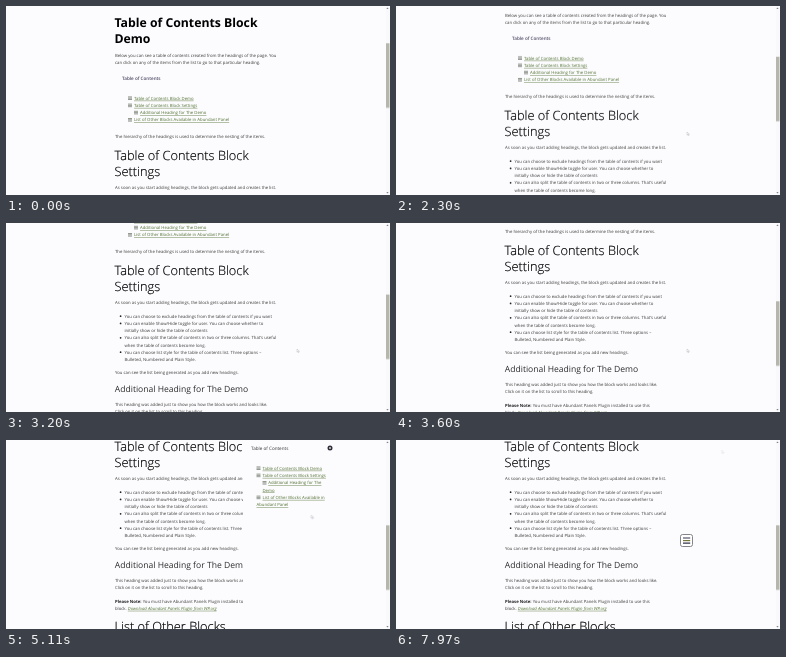
An HTML page for the animation above (8000 ms loop, 384x189 px).

```html
<!DOCTYPE html>
<html lang="en">
<head>
<meta charset="utf-8">
<title>Table of Contents Block Demo</title>
<style>
html, body { margin: 0; width: 100%; height: 100%; overflow: hidden; background: #fcfcff; }
svg { display: block; width: 100vw; height: 100vh; }
text { font: 4.28px "Open Sans", "Noto Sans", sans-serif; fill: #3c3c38; text-rendering: geometricPrecision; white-space: pre; }
.title { font-size: 12.25px; font-weight: 700; fill: #000; }
.h2 { font-size: 12.8px; font-weight: 300; fill: #000; stroke: #000; stroke-width: .18px; }
.h3 { font-size: 8.57px; fill: #2c2c2c; }
.label { font-size: 4.6px; font-weight: 600; fill: #4c4860; }
.panelLabel { font-size: 4.6px; font-weight: 500; fill: #333; }
.strong { font-weight: 700; fill: #222; }
.link { fill: #53702f; text-decoration: underline; text-decoration-color: #7f9c50; text-decoration-thickness: .5px; }
.italic { font-style: italic; }
</style>
</head>
<body>
<svg viewBox="0 0 384 189" preserveAspectRatio="none">
  <rect width="384" height="189" fill="#fcfcff"/>
  <g id="page"></g>
  <g id="panel"><rect x="237" width="147" height="189" fill="#fcfcff"/></g>
  <g id="button">
    <rect x="284.5" y="94.5" width="12" height="12" rx="2" fill="#fff" stroke="#77777f" stroke-width=".9"/>
    <path d="M287 98h7.2M287 103.2h7.2" stroke="#34344c" stroke-width="1.2"/>
    <path d="M287 100.6h7.2" stroke="#77773c" stroke-width="1.2"/>
  </g>
  <rect x="380" width="4" height="189" fill="#f9f9fc"/>
  <path d="M380.3 3l1.2-1.4 1.2 1.4zM380.3 186l1.2 1.4 1.2-1.4z" fill="#85858c"/>
  <rect id="thumb" x="380" width="3.5" height="64.5" fill="#b6b6ac"/>
  <g id="cursor">
    <path id="arrow" d="M0 0v3.2l.8-.7.6 1.2.5-.3-.5-1.1h1.1z" fill="#fff" stroke="#a6a6b0" stroke-width=".4"/>
    <path id="hand" d="M-.8-2.2q.8-.7 1.3 0v2l2 .6v2.2l-.8 1.6h-3l-1.6-2.6.7-.6 1.4.8z" fill="#fff" stroke="#222" stroke-width=".6"/>
  </g>
</svg>
<script>
const DURATION = 8000;
const $ = id => document.getElementById(id);
const page = $('page'), panel = $('panel');

function add(parent, tag, attrs, content = '') {
  const node = document.createElementNS('http://www.w3.org/2000/svg', tag);
  for (const key in attrs) node.setAttribute(key, attrs[key]);
  node.textContent = content;
  parent.append(node);
  return node;
}

const write = (parent, x, y, content, style = '') =>
  add(parent, 'text', { x, y, class: style }, content);

function tocItem(parent, x, y, gap, ...lines) {
  add(parent, 'path', {
    d: `M${x} ${y - 2.8}h4M${x} ${y - 1.5}h4M${x} ${y - .2}h4`,
    stroke: '#5d6555', 'stroke-width': .65
  });
  lines.forEach(([content, left = x + gap], i) => write(parent, left, y + i * 7.2, content, 'link'));
}

function bullet(y, ...lines) {
  add(page, 'circle', { cx: 114.6, cy: y - 1.5, r: .85, fill: '#222' });
  lines.forEach((content, i) => write(page, 118.5, y + i * 7.2, content));
}

write(page, 108.5, 20.5, 'Table of Contents Block', 'title');
write(page, 108.5, 36.5, 'Demo', 'title');
write(page, 109, 50.5, 'Below you can see a table of contents created from the headings of the page. You');
write(page, 109, 57.6, 'can click on any of the items from the list to go to that particular heading.');
write(page, 116, 73.7, 'Table of Contents', 'label');
tocItem(page, 122, 93.7, 6, ['Table of Contents Block Demo']);
tocItem(page, 122, 100.9, 6, ['Table of Contents Block Settings']);
tocItem(page, 128, 108.1, 6, ['Additional Heading for The Demo']);
tocItem(page, 122, 115.3, 6, ['List of Other Blocks Available in Abundant Panel']);
write(page, 109, 132, 'The hierarchy of the headings is used to determine the nesting of the items.');
write(page, 108.5, 153.7, 'Table of Contents Block', 'h2');
write(page, 108.5, 169.7, 'Settings', 'h2');
write(page, 109, 183.2, 'As soon as you start adding headings, the block gets updated and creates the list.');
bullet(196.7, 'You can choose to exclude headings from the table of contents if you want');
bullet(203.9, 'You can enable Show/Hide toggle for user. You can choose whether to',
  'initially show or hide the table of contents');
bullet(218.3, 'You can also split the table of contents in two or three columns. That\u2019s useful',
  'when the table of contents become long.');
bullet(232.7, 'You can choose list style for the table of contents list. Three options \u2013',
  'Bulleted, Numbered and Plain Style.');
write(page, 109, 253.4, 'You can see the list being generated as you add new headings.');
write(page, 108.8, 270.6, 'Additional Heading for The Demo', 'h3');
write(page, 109, 285.2, 'This heading was added just to show you how the block works and looks like.');
write(page, 109, 292.4, 'Click on it on the list to scroll to this heading.');
const note = write(page, 109, 305.6, '');
add(note, 'tspan', { class: 'strong' }, 'Please Note:');
note.append(' You must have Abundant Panels Plugin installed to use this');
const download = write(page, 109, 312.8, 'block. ');
add(download, 'tspan', { class: 'link italic' }, 'Download Abundant Panels Plugin from WP.org');
write(page, 108.5, 333.7, 'List of Other Blocks', 'h2');

write(panel, 245, 9.8, 'Table of Contents', 'panelLabel');
add(panel, 'circle', { cx: 324, cy: 8, r: 2.5, fill: '#2e2e38' });
add(panel, 'path', { d: 'M323 7l2 2M325 7l-2 2', stroke: '#fff', 'stroke-width': .6 });
tocItem(panel, 250.5, 29.7, 6, ['Table of Contents Block Demo']);
tocItem(panel, 250.5, 36.9, 6, ['Table of Contents Block Settings']);
tocItem(panel, 256.5, 44.3, 5.7, ['Additional Heading for The'], ['Demo', 256.5]);
tocItem(panel, 250.5, 58.9, 6, ['List of Other Blocks Available in'], ['Abundant Panel', 250.5]);

// Each step: [time in ms, value, optional easing towards the next step].
function play(id, steps, toStyle) {
  const frames = steps.map(([time, value, easing = 'linear']) =>
    ({ offset: time / DURATION, easing, ...toStyle(value) }));
  $(id).animate(frames, { duration: DURATION, iterations: Infinity });
}

const move = (x, y) => ({ transform: `translate(${x}px, ${y}px)` });
const fade = opacity => ({ opacity });
const hold = 'step-end';

const scroll = [[0, 0], [1750, 0], [2300, 40], [2840, 84], [3600, 122], [3980, 143], [8000, 143]];
play('page', scroll, y => move(0, -y));
play('thumb', scroll, y => move(0, 37.3 + y * .336));
play('panel', [[0, 147], [3700, 147, 'ease-out'], [4060, 0], [7100, 0, 'ease-in'], [7500, 147], [8000, 147]],
  x => move(x, 0));
play('button', [[0, 0, hold], [7560, 0], [7700, 1], [8000, 1]], fade);
play('cursor', [
  [0, [390, 90]], [300, [390, 90], 'ease-in-out'], [1100, [291, 126]],
  [4440, [291, 126], 'ease-in-out'], [5900, [324, 8]],
  [7500, [324, 8]], [7700, [325.5, 10]], [8000, [325.5, 10]]
], point => move(...point));
play('hand', [[0, 0, hold], [5860, 1, hold], [7400, 0, hold], [8000, 0]], fade);
play('arrow', [[0, 1, hold], [5860, 0, hold], [7400, .4, hold], [8000, .4]], fade);
</script>
</body>
</html>
```
